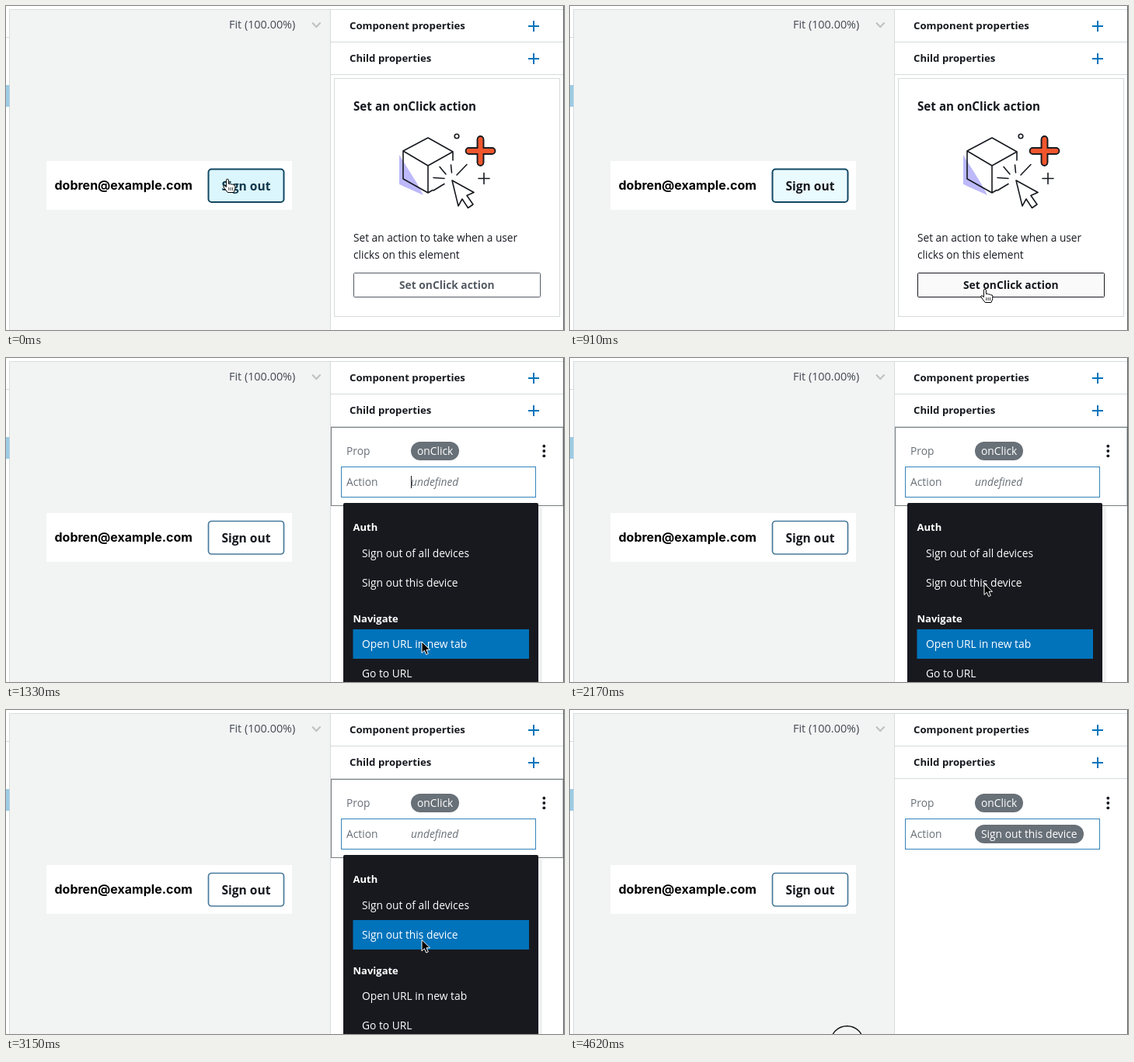
Write an HTML page that moves like this. It is 718x418 px and loops after 4.69 s.

```html
<!DOCTYPE html>
<html lang="en">
<head>
<meta charset="utf-8">
<title>Set an onClick action</title>
<style>
  html, body { margin: 0; width: 100%; height: 100%; overflow: hidden; background: #fff; }
  svg { display: block; font: 13.8px "Open Sans", "Noto Sans", sans-serif; fill: #16191f; }
  .bold { font-weight: 700; }
  .head { font-size: 13.2px; }
  .mid { text-anchor: middle; }
  .label { fill: #687078; }
  .light { fill: #fff; }
  .rule { stroke: #d5dbdb; fill: none; }
  .ink { stroke: #16191f; stroke-width: 1.6; fill: none; stroke-linecap: round; stroke-linejoin: round; }
  .plus { stroke: #0073bb; stroke-width: 2; }
  .pill { fill: #687078; }
</style>
</head>
<body>
<svg width="718" height="418" viewBox="0 0 718 418">
  <rect width="718" height="418" fill="#fff"/>
  <rect x="5" y="5" width="412" height="413" fill="#f2f3f3"/>
  <path class="rule" d="M4.5 418V4.5H718M0 40.5H4M417.5 5V418M418 46.5H717M418 88.5H717"/>
  <rect y="102" width="4.5" height="28" fill="#9ccbe4"/>

  <text x="287" y="29" font-size="14.4" fill="#444b54">Fit (100.00%)</text>
  <path d="M394 21.5L399.3 27L404.6 21.5" fill="none" stroke="#bcc1c2" stroke-width="2"/>

  <rect x="52" y="200" width="316" height="63" fill="#fff"/>
  <text class="bold" x="62.5" y="237" style="font-family:Inter,sans-serif;font-size:16px" fill="#000">dobren@example.com</text>
  <rect id="signOut" x="260.5" y="210.5" width="97" height="42.5" rx="4"/>
  <text id="signOutText" class="bold mid" x="309" y="237.5" font-size="15.55">Sign out</text>

  <text class="bold head" x="442" y="30">Component properties</text>
  <text class="bold head" x="442" y="72">Child properties</text>
  <path class="plus" d="M672 26H686M679 19V33M672 68H686M679 61V75"/>

  <g id="emptyCard">
    <rect class="rule" x="422.5" y="93.5" width="290" height="307"/>
    <text class="bold" x="447" y="135" font-size="15.2">Set an onClick action</text>
    <path d="M506 192V230L537 244L529 229Z" fill="#bdb9fa"/>
    <path class="ink" d="M575 199V188L543 170L511 187V223L543 241L549 237.5M511 187L543 206L575 188M543 206V241"/>
    <path class="ink" d="M550 221.5L564 222.5M550 238L564 229.5M558 207.5L566 217M572.5 205L573.5 215M580 218L593 204.5M608 222.5H622M615 215.5V229.5"/>
    <path class="ink" d="M574 225L602 240.5L593 244.5L601 256L594.5 260.5L587 249L582 258Z" fill="#fff"/>
    <circle class="ink" cx="580" cy="168" r="2.8"/>
    <g fill="none" stroke-linecap="round">
      <path id="cross" d="M595.5 187H625.5M610.5 172V202" stroke="#16191f" stroke-width="9.5"/>
      <use href="#cross"/>
      <path d="M595.5 187H625.5M610.5 172V202" stroke="#f2562d" stroke-width="6"/>
    </g>
    <text x="447" y="304" font-size="13.7">Set an action to take when a user</text>
    <text x="447" y="326" font-size="13.7">clicks on this element</text>
    <rect id="setButton" x="447.5" y="344.5" width="240" height="31" rx="1"/>
    <text id="setText" class="bold mid" x="567.3" y="365">Set onClick action</text>
  </g>

  <g id="propCard">
    <rect id="focusBox" x="418.5" y="89.5" width="298.5" height="101" fill="none" stroke="#777c80"/>
    <text class="label" x="438" y="125">Prop</text>
    <rect class="pill" x="521" y="108" width="62" height="24" rx="12"/>
    <text class="light" x="529" y="125">onClick</text>
    <g><circle cx="692.3" cy="113.7" r="1.9"/><circle cx="692.3" cy="120" r="1.9"/><circle cx="692.3" cy="126.3" r="1.9"/></g>
    <rect x="431.5" y="140.5" width="250" height="39" fill="#fff" stroke="#3584b8"/>
    <text class="label" x="438" y="165">Action</text>
    <g id="chosen">
      <rect class="pill" x="521" y="148" width="140" height="24" rx="12"/>
      <text class="light" x="529" y="165">Sign out this device</text>
    </g>
  </g>

  <g id="menu">
    <text class="label" x="521" y="165" font-style="italic">undefined</text>
    <path id="caret" d="M521.5 152V168" stroke="#16191f"/>
    <rect x="434" y="192" width="256" height="226" fill="#f1f2f2"/>
    <rect x="434" y="187" width="251" height="240" rx="2" fill="#18191f"/>
    <rect id="hover" x="446.5" width="226.5" height="38" fill="#0073bb"/>
    <g class="light">
      <text class="bold" x="446.5" y="223" font-size="13">Auth</text>
      <text x="458" y="256.5">Sign out of all devices</text>
      <text x="458" y="294.5">Sign out this device</text>
      <text class="bold" x="446.5" y="340.5" font-size="13">Navigate</text>
      <text x="458" y="374">Open URL in new tab</text>
      <text x="458" y="412">Go to URL</text>
    </g>
  </g>

  <path d="M717.5 0V418" stroke="#5c6063"/>
  <circle id="ring" cx="356.5" cy="428.7" r="21" fill="none" stroke="#111" stroke-width="1.4"/>
  <path id="arrow" d="M0 0V14.5L3.4 11.3L5.7 16.6L8.3 15.5L6 10.3H10.5Z" fill="#000" stroke="#fff"/>
  <g id="hand" fill="#fff" stroke="#000" stroke-linejoin="round">
    <path d="M-1.6 10.5V1.8a1.5 1.5 0 0 1 3 0V6.5q3-.9 3.2.6q2.6-.6 2.8.7q2.4-.4 2.4 1.5v3.6l-1.8 4.6H.2L-4.8 11q-1.4-2.2.8-2.4z"/>
    <path d="M1.8 11V15M4.2 11V15M6.6 11V15" stroke-width=".8"/>
  </g>
</svg>
<script>
const LOOP = 4690, STEP = 70;
const $ = id => document.getElementById(id);
const set = (id, attrs) => {
  for (const name in attrs) $(id).setAttribute(name, attrs[name]);
};
const show = (id, on) => set(id, { visibility: on ? "visible" : "hidden" });
const within = (t, from, to) => t >= from && t < to;

// time, x, y of the pointer tip
const path = [
  [0, 285, 223], [70, 296, 229], [140, 330, 247], [280, 440, 307], [350, 490, 335],
  [420, 522, 353], [490, 534, 358], [560, 536, 368], [700, 536, 369],
  [770, 535, 368], [910, 534, 365], [980, 534, 365], [1050, 535, 366],
  [1750, 535, 366], [1890, 534, 360], [2170, 533, 291], [2310, 532, 262],
  [2450, 532, 260], [2520, 532, 260], [2730, 534, 275], [2870, 535, 293],
  [3080, 535, 293], [3150, 535, 296.5], [3990, 535, 296.5],
  [4060, 523, 322], [4130, 466, 400], [4200, 440, 440], [LOOP, 440, 440]
];

function pointer(t) {
  const i = path.findIndex(p => p[0] > t);
  const [t0, x0, y0] = path[i - 1], [t1, x1, y1] = path[i];
  const k = (t - t0) / (t1 - t0);
  return [x0 + (x1 - x0) * k, y0 + (y1 - y0) * k];
}

const mix = (a, b, k) =>
  `rgb(${a.map((v, i) => Math.round(v + (b[i] - v) * k))})`;
const ramp = (t, from, to) => Math.min(1, Math.max(0, (t - from) / (to - from)));

function drawSignOut(t) {
  const leave = ramp(t, 70, 280), blur = ramp(t, 1050, 1260);
  set("signOut", {
    fill: blur ? mix([234, 251, 255], [255, 255, 255], blur)
               : mix([220, 246, 253], [234, 251, 255], leave),
    stroke: mix([18, 72, 100], [72, 122, 155], blur),
    "stroke-width": 2 - 0.3 * blur
  });
  set("signOutText", { fill: mix([13, 55, 75], [22, 25, 31], ramp(t, 70, 280)) });
}

function draw(t) {
  const [x, y] = pointer(t);
  const empty = t < 1330, open = within(t, 1330, 3290);
  const isHand = t < 140 || within(t, 420, 1050);

  drawSignOut(t);
  show("emptyCard", empty);
  show("propCard", !empty);
  show("focusBox", open);
  show("menu", open);
  show("chosen", t >= 3290);
  show("caret", open && (t < 1890 || within(t, 2380, 2870)));
  set("hover", { y: t < 2240 ? 350 : t < 2310 || t >= 2800 ? 271 : 233 });

  const dark = t >= 420 ? "#16191f" : "#545b64";
  set("setButton", { stroke: dark, fill: t >= 1050 ? "#eaeded" : t >= 420 ? "#fafafa" : "#fff" });
  set("setText", { fill: dark });

  show("hand", isHand);
  show("arrow", !isHand);
  set(isHand ? "hand" : "arrow", { transform: `translate(${x} ${y})` });
  show("ring", t >= 4620);
}

const start = performance.now();
function tick() {
  const t = (performance.now() - start) % LOOP;
  draw(Math.floor(t / STEP) * STEP);
  requestAnimationFrame(tick);
}
draw(0);
requestAnimationFrame(tick);
</script>
</body>
</html>
```
